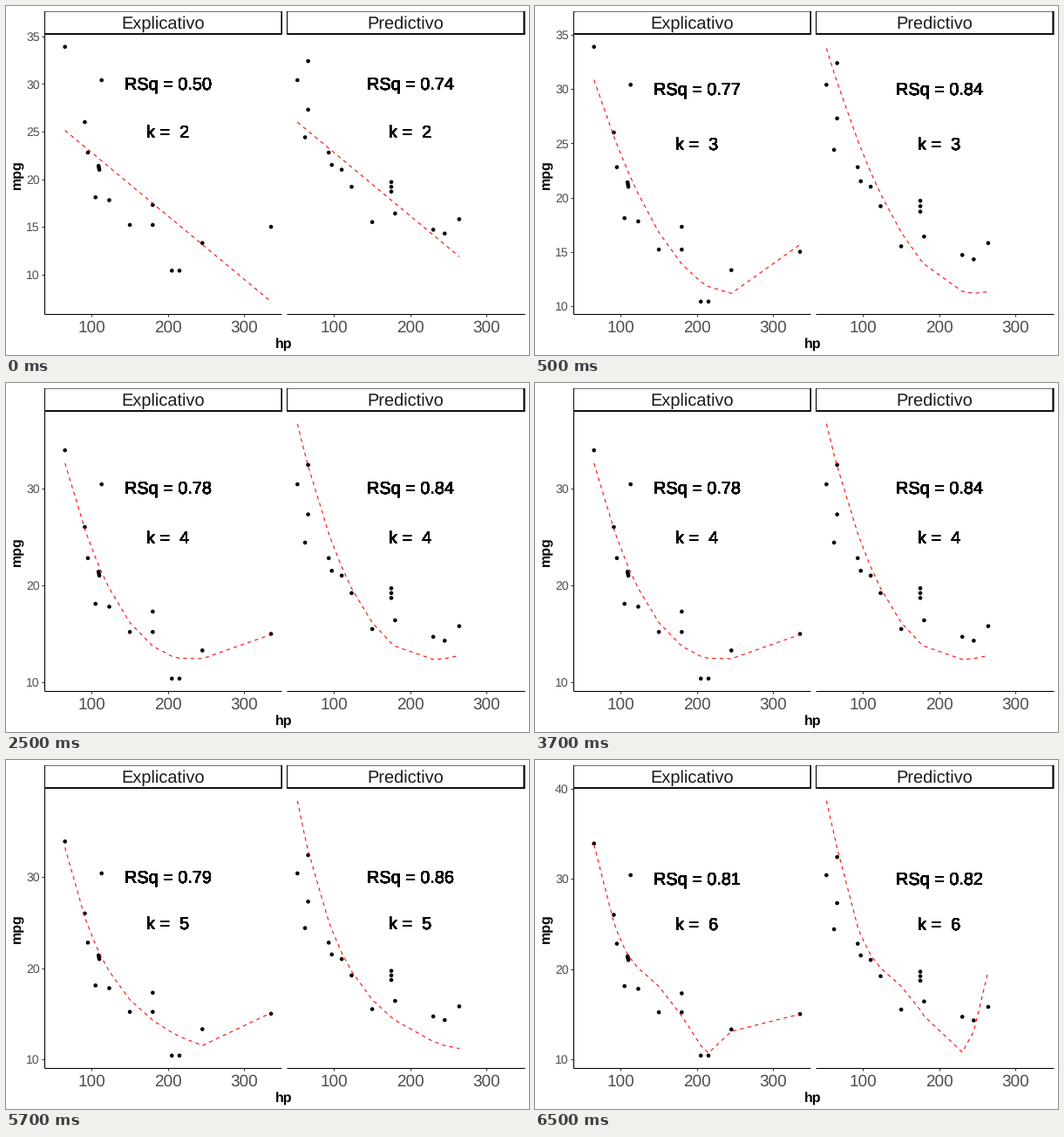
Recreate the animation shown at these times as a matplotlib script. Size 600x400 px, loop 8 s.

```python
import numpy as np
import matplotlib.pyplot as plt
from matplotlib.animation import FuncAnimation
from matplotlib.patches import Circle, Rectangle

plt.rcParams["font.family"] = "Liberation Sans"
plt.rcParams["text.hinting"] = "none"

W, H, DPI = 600, 400, 100
PT = 72 / DPI  # points per pixel
STRIP_TOP, TOP, BOTTOM = 5.5, 32.2, 353.4
LEFT, GAP, PANEL_W = 43.9, 5.5, 272.55
DEGREES = (1, 2, 3, 4, 6)
TITLES = ("Explicativo", "Predictivo")


def run(start, end, n=2):
    """Evenly spaced observations from start to end."""
    return np.linspace(start, end, n)


TRAIN = np.vstack([
    run((65, 33.9), (113, 30.4)), run((91, 26), (95, 22.8)),
    run((109, 21.4), (110, 21), 3), run((105, 18.1), (123, 17.8)),
    run((180, 17.3), (180, 15.2)), (150, 15.2),
    run((205, 10.4), (215, 10.4)), run((245, 13.3), (335, 15))])
TEST = np.vstack([
    run((52, 30.4), (66, 32.4)), run((66, 27.3), (62, 24.4)),
    run((93, 22.8), (97, 21.5)), run((110, 21), (123, 19.2)),
    run((175, 18.7), (175, 19.7), 3), run((150, 15.5), (180, 16.4)),
    run((230, 14.7), (245, 14.3)), (264, 15.8)])
SETS = (TRAIN, TEST)


def scale(values, pixel_from, pixel_to):
    """Map data to pixels, with 5 % of room at either end."""
    low, high = np.min(values), np.max(values)
    pad = 0.05 * (high - low)
    span = high - low + 2 * pad
    to_px = lambda v: pixel_from + (pixel_to - pixel_from) * (v - low + pad) / span
    return to_px, high + pad


to_x, _ = scale(np.vstack(SETS)[:, 0], 0, PANEL_W)

fig = plt.figure(figsize=(W / DPI, H / DPI), dpi=DPI, facecolor="white")
ax = fig.add_axes([0, 0, 1, 1])


def label(x, y, text, size, color="black", ha="center", **kw):
    ax.text(x, y, text, fontsize=size * PT, color=color, ha=ha,
            va="baseline", **kw)


def line(xs, ys, color="black", **kw):
    ax.plot(xs, ys, color=color, lw=1.07 * PT, solid_capstyle="butt", **kw)


def draw_panel_frame(left, title):
    right = left + PANEL_W
    strip = Rectangle((left, STRIP_TOP), PANEL_W, TOP - STRIP_TOP, fc="white",
                      ec="black", lw=2.13 * PT, joinstyle="miter", snap=False)
    ax.add_patch(strip)
    # The outer half of the border shows only on the right and the bottom.
    strip.set_clip_path(Rectangle((left, STRIP_TOP), PANEL_W + 1,
                                  TOP - STRIP_TOP + 1, transform=ax.transData))
    label((left + right) / 2, 26, title, 20, "#1a1a1a")
    line([left, right], [BOTTOM, BOTTOM])
    for hp in (100, 200, 300):
        x = left + to_x(hp)
        line([x, x], [BOTTOM, BOTTOM + 2.8], "#333333")
        label(x, 373.7, str(hp), 19, "#4d4d4d")


def draw(n):
    ax.clear()
    ax.set(xlim=(0, W), ylim=(H, 0))
    ax.axis("off")

    k = 2 + (n + 3) // 4
    model = np.polynomial.Polynomial.fit(*TRAIN.T, DEGREES[k - 2])
    mpg_all = np.concatenate([np.append(s[:, 1], model(s[:, 0])) for s in SETS])
    to_y, mpg_top = scale(mpg_all, BOTTOM, TOP)

    for panel, (data, title) in enumerate(zip(SETS, TITLES)):
        left = LEFT + panel * (PANEL_W + GAP)
        draw_panel_frame(left, title)
        hp, mpg = data.T
        for centre in zip(left + to_x(hp), to_y(mpg)):
            ax.add_patch(Circle(centre, 2.3, color="black", lw=0))
        grid = np.unique(hp)
        line(left + to_x(grid), to_y(model(grid)), "red", dashes=(4, 4))

        rsq = np.corrcoef(mpg, model(hp))[0, 1] ** 2
        x = left + to_x(200)
        # One label per observation: overprinting hardens the glyph edges.
        for _ in data:
            label(x, to_y(30) + 7.4, f"RSq = {rsq:.2f}", 19.9)
            label(x, to_y(25) + 7.4, f"k =  {k}", 19.9)

    line([LEFT, LEFT], [TOP, BOTTOM])
    for mpg in np.arange(10, mpg_top, 5 if k < 4 else 10):
        y = to_y(mpg)
        line([LEFT - 2.8, LEFT], [y, y], "#333333")
        label(38.6, y + 5, f"{mpg:.0f}", 14, "#4d4d4d", ha="right")

    label(318.7, 392, "hp", 16, weight="bold")
    label(17.4, 193, "mpg", 16, weight="bold", rotation=90,
          rotation_mode="anchor")
    return []


anim = FuncAnimation(fig, draw, frames=16, interval=500, repeat=True,
                     repeat_delay=0, init_func=lambda: [])
plt.show()
```
